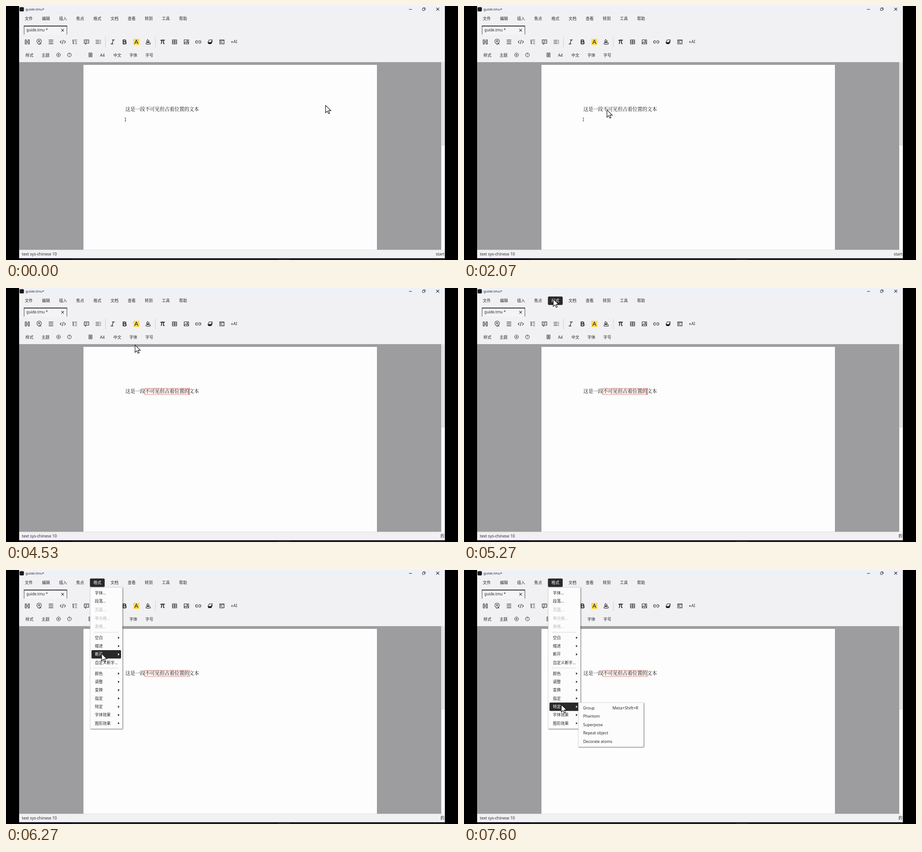
An HTML page for the animation above (8000 ms loop, 998 by 561 pixels).

```html
<!DOCTYPE html>
<html lang="zh-CN">
<head>
<meta charset="utf-8">
<style>
html, body { margin: 0; width: 100%; height: 100%; overflow: hidden; background: #000; }
svg { display: block; width: 998px; height: 561px; }
text { font: 8.7px "Noto Sans", "Noto Sans CJK SC", "Noto Sans CJK", sans-serif; fill: #29282a; white-space: pre; }
.doc { font: 10.83px "Noto Serif CJK SC", "Noto Sans CJK SC", "Noto Sans CJK", serif; fill: #111; }
.ico { fill: none; stroke: #1c1b1d; stroke-width: 1.05; stroke-linejoin: round; }
.ico .f { fill: #1c1b1d; stroke: none; }
.ico text { fill: #1c1b1d; stroke: none; text-anchor: middle; }
.hit .bg { fill: none; }
.hit.on .bg { fill: #2a282b; }
.hit.on text, .hit.on .arr { fill: #fff; }
.off text { fill: #b9b7ba; }
.arr { fill: #1c1b1d; }
.panel { fill: #fdfcfd; stroke: #cfcdd0; stroke-width: .6; filter: drop-shadow(1px 1px .8px #0008); }
</style>
</head>
<body>
<script>
const LOOP = 8000, STEP = 200 / 3;

const rect = (x, y, w, h, fill, more = '') =>
  `<rect x="${x}" y="${y}" width="${w}" height="${h}" fill="${fill}" ${more}/>`;
const path = (d, more = '') => `<path d="${d}" ${more}/>`;
const group = (inner, more = '') => `<g ${more}>${inner}</g>`;
// y is the vertical middle of the line
const label = (x, y, s, size = 8.7, more = '') =>
  `<text x="${x}" y="${y + size * .36}" style="font-size:${size}px" ${more}>${s}</text>`;
const icon = (x, y, inner) => group(inner, `class="ico" transform="translate(${x} ${y})"`);

// ---- window frame ----
function frame() {
  return rect(29, 0, 940, 557, '#f1f0f2') + rect(29, 0, 940, 14, '#eff1f8') +
    rect(29, 557, 940, 4, '#1d1c21') + rect(29, 557, 115, 4, '#15112b') + rect(601, 559, 26, 1, '#3a393d') +
    rect(30, 2.5, 9.5, 9.5, '#1a1a1c', 'rx="2"') +
    label(43, 7.5, 'guide.tmu*', 7.7) +
    icon(893, 7, path('M-3.2 .5H3.2')) +
    icon(922.5, 7, path('M-3-1.4q0-.6.6-.6h3.4q.6 0 .6.6v3.8q0 .6-.6.6h-3.4q-.6 0-.6-.6zM-1.4-3.2h3.4q1.2 0 1.2 1.2V1.6', 'stroke-width=".9"')) +
    icon(953.3, 7, path('M-3.2-3.2L3.2 3.2M3.2-3.2L-3.2 3.2'));
}

function tab() {
  return rect(40, 44, 95, 19, '#f4f3f5') +
    path('M40 63V44M134.5 44V63', 'stroke="#4a474c" fill="none"') +
    rect(39.5, 43.4, 95.5, 1.8, '#2a2030') +
    label(45, 53, 'guide.tmu *', 8.35) +
    icon(125, 53.7, path('M-2.8-2.8L2.8 2.8M2.8-2.8L-2.8 2.8'));
}

// ---- toolbar ----
function tools() {
  const lines = 'M-5-4H5M-5 0H5M-5 4H5';
  const set = [
    path('M-4.6-4.6h2.8v9.2h-2.8zM1.8-4.6h2.8v9.2H1.8zM-1.8 0h3.6'),
    path('M0 5.6L-3.7 2a5 5 0 1 1 7.4 0z') + '<circle cy="-1.6" r="1.7"/>' + path('M1 3l3.6 2'),
    path(lines, 'stroke-width="1.2"'),
    path('M-3-3L-6 0l3 3M3-3L6 0l-3 3M1-4.5l-2 9'),
    path('M-5-4h3M-1-4H5M-3.5-4V4H-1M-3.5 0H-1M1 0H5M1 4H5'),
    path('M-5-4.6H5V3H0l-2.5 2.4V3H-5zM-2.6-2H2.6M-2.6.6H1'),
    path('M-6-3.5H2.5M-6 0H2.5M-6 3.5H2.5') + path('M4-4.1h1.6v1.2H4zM4-.6h1.6v1.2H4zM4 2.9h1.6v1.2H4z', 'class="f"')
  ];
  const at = set.map((s, i) => icon(47 + i * 26.15, 79.3, s)).join('');
  const font = [
    path('M-1.5-4.5H4.5M-4.5 4.5H1.5M1.6-4.5l-3.2 9', 'stroke-width="1.2"'),
    path('M-3-4.2H.8a2 2 0 0 1 0 4.1H-3zM-3-.1H1.3a2.2 2.2 0 0 1 0 4.4H-3z', 'stroke-width="1.8"'),
    rect(-6.7, -6.7, 13.4, 13.4, '#fbdc4e', 'stroke="none"') + path('M-3.8 4.5L0-4.5 3.8 4.5M-2.5 1.5H2.5', 'stroke-width="1.1"'),
    path('M-1.4-5.2l4 3.6-3.2 3-3-2.6zM-2.6-.6H2') + '<rect x="-5" y="1.8" width="10" height="3.4" rx="1.7"/>'
  ].map((s, i) => icon(235.5 + i * 26.15, 79.3, s)).join('');
  const insert = [
    path('M-4.6-2.6q.4-1.3 1.8-1.3H4.7M-1.8-3.8q0 5-1.7 8.2M1.7-3.8v6.3q0 1.8 2.3 1.3', 'stroke-width="1.7"'),
    path('M-4.7-4.5H4.7V4.5H-4.7zM-4.7-1.5H4.7M-4.7 1.5H4.7M0-4.5V4.5'),
    path('M-5-4.5H5V4.5H-5zM-5 3l3-3 2.4 2.4L2.4.4 5 3') + '<circle cx="1.8" cy="-1.8" r=".9"/>',
    path('M-1-2.6h-2.4a2.6 2.6 0 0 0 0 5.2H-1M1-2.6h2.4a2.6 2.6 0 0 1 0 5.2H1M-2.8 0H2.8'),
    path('M-1.8-4.5H5L2.2 1H-4.8z') + path('M-5.4 1H2.4L5-3.6V.5L2.6 4.8H-3.6z', 'class="f"'),
    path('M-4.8-4.5H4.8V4.5H-4.8zM-4.8-2.5H4.8M-2.8-.8l1.6 1.5-1.6 1.5M0 2.4h2.6')
  ].map((s, i) => icon(346 + i * 26.15, 79.3, s)).join('');
  return at + font + insert +
    '<circle cx="499" cy="79.5" r="2" fill="#4a9c72"/>' + label(502, 79.3, 'AI', 8.7) +
    path('M219.5 68V91M330 68V91', 'stroke="#cfcdd1"') + path('M32.5 68V121', 'stroke="#e6e4e8"');
}

function styleBar() {
  const words = [[43, '样式'], [78.5, '主题'], [207.5, 'A4'], [237, '中文'], [272.5, '字体'], [307.7, '字号']];
  return words.map(([x, s]) => label(x, 109, s, 8.8)).join('') +
    icon(116, 108, '<circle r="4.2" stroke-width=".9"/>' + path('M-2 0H2M0-2V2', 'stroke-width=".9"')) +
    icon(140, 108, '<circle r="4.2" stroke-width=".9"/>' + label(0, 0, '?', 6.5)) +
    icon(186.5, 108, path('M-3.5-4.3H3.5V4.3H-3.5zM-2-2.2H2M-2-.7H2M-2 .8H2M-2 2.3H2', 'stroke-width=".9"'));
}

function desk() {
  return rect(29, 124, 932, 414.5, '#9d9c9e') + rect(171, 130, 648, 408.5, '#fefdfe') +
    rect(961, 124, 8, 414.5, '#fbfafb') + rect(961.5, 124, 7, 184.5, '#e1e0e2') +
    label(35, 547.8, 'text sys-chinese 10', 8.75);
}

// ---- menus ----
const names = ['文件', '编辑', '插入', '焦点', '格式', '文档', '查看', '转到', '工具', '帮助'];
const tabX = i => 50.3 + i * 37.85;
const menuBar = names.map((s, i) => group(
  rect(tabX(i) - 16.4, 18.8, 32.6, 18.8, '', 'class="bg" rx="2.5"').replace('fill=""', '') +
  label(tabX(i), 28.2, s, 8.75, 'text-anchor="middle"'), `class="hit" id="m${i}"`)).join('');

// [label, middle, kind]: a has a submenu, d is disabled
const rows = [
  ['字体...', 50.5], ['段落...', 69], ['页面...', 87.7, 'd'], ['单元格...', 106.5, 'd'], ['表格...', 125.3, 'd'],
  ['空白', 149.7, 'a'], ['缩进', 168, 'a'], ['断开', 186.3, 'a'], ['自定义断字...', 204.7],
  ['颜色', 228.7, 'a'], ['调整', 247, 'a'], ['变换', 265.3, 'a'], ['指定', 283.6, 'a'],
  ['特定', 302, 'a'], ['字体效果', 320.2, 'a'], ['图形效果', 338.5, 'a']
];
const menu = rect(186, 38.5, 71, 312, '', 'class="panel"').replace('fill=""', '') +
  path('M194 137.5H248M194 216.5H248', 'stroke="#d8d6d9"') +
  rows.map(([s, y, kind], i) => group(
    `<rect class="bg" x="188.7" y="${y - 9.2}" width="65.3" height="18.4" rx="2"/>` +
    label(196.3, y, s, 8.7) +
    (kind == 'a' ? path(`M247.3 ${y - 2.6}l3.4 2.6-3.4 2.6z`, 'class="arr"') : ''),
    `class="hit ${kind == 'd' ? 'off' : ''}" id="r${i}"`)).join('');

const submenu = (id, top, w, items, keys = '') => group(
  `<rect class="panel" x="252.7" y="${top}" width="${w}" height="${items.length * 18.35 + 5.8}"/>` +
  items.map((s, i) => label(263, top + 12 + i * 18.35, s, 8.65)).join('') +
  (keys && label(385, top + 12, keys, 9.1, 'text-anchor="end"')), `id="${id}"`);

const cursor = path('M.6.6V16.6L4.4 13.1 7 18.8 9.6 17.6 7.1 12.1H12.4z',
  'id="cursor" fill="#fff" stroke="#111" stroke-width="1.15"');

document.body.innerHTML = `<svg viewBox="0 0 998 561">` +
  frame() + menuBar + tab() + tools() + styleBar() + desk() +
  label(968, 547.8, 'start', 8.75, 'id="status" text-anchor="end"') +
  rect(306.5, 221.5, 0, 14, '#faf1ef', 'id="sel" stroke="#d98b85" stroke-width=".9"') +
  '<text class="doc" x="263.6" y="232">这是一段不可见但占着位置的文本</text>' +
  path('', 'id="caret" fill="none"') +
  group(menu, 'id="menu"') +
  submenu('specific', 274.5, 67, ['TeXmacs', 'LaTeX', 'HTML', '屏幕', '打印机', '图像', '偶数页', '奇数页']) +
  submenu('special', 293, 143.7, ['Group', 'Phantom', 'Superpose', 'Repeat object', 'Decorate atoms'], 'Meta+Shift+R') +
  cursor + '</svg>';

// ---- motion ----
const keys = [ // time, x, y of the pointer tip
  [0, 705, 219], [500, 202, 91], [867, 330, 231], [1000, 334, 239], [1230, 282, 74], [1467, 315, 229],
  [2067, 315, 229], [2270, 309, 229], [2867, 390, 228], [3333, 398, 228], [3533, 402, 228], [4133, 402, 228],
  [4933, 168, 24], [5000, 168, 24], [5267, 196.5, 24], [5867, 196.5, 24], [6267, 210.5, 184], [6733, 212, 278],
  [6933, 212, 289], [7000, 212, 289], [7267, 214.3, 297], [LOOP, 214.3, 297]
];
const slope = (i, k) => keys[i] && keys[i + 1]
  ? (keys[i + 1][k] - keys[i][k]) / (keys[i + 1][0] - keys[i][0]) : 0;
const tangent = (i, k) => {
  const a = slope(i - 1, k), b = slope(i, k);
  return a * b > 0 ? 2 * a * b / (a + b) : 0;
};
// Monotone cubic through the keys: smooth without overshoot
function at(t, k) {
  let i = 0;
  while (i < keys.length - 2 && t >= keys[i + 1][0]) i++;
  const h = keys[i + 1][0] - keys[i][0], u = (t - keys[i][0]) / h, v = 1 - u;
  return keys[i][k] * (1 + 2 * u) * v * v + keys[i + 1][k] * (3 - 2 * u) * u * u +
    h * u * v * (tangent(i, k) * v - tangent(i + 1, k) * u);
}

const $ = id => document.getElementById(id);
const show = (id, on) => $(id).style.display = on ? '' : 'none';
const CHAR = 10.83, SEL = 306.5;

function draw(time) {
  const t = Math.floor((time + 4) / STEP) * STEP + 1;
  const x = at(t, 1), y = at(t, 2), open = t >= 5460;
  $('cursor').setAttribute('transform', `translate(${x} ${y})`);

  const drag = t > 2260;
  const count = drag ? Math.max(0, Math.min(9, Math.round((at(Math.min(t, 3540), 1) - SEL) / CHAR))) : 0;
  const end = SEL + count * CHAR;
  show('sel', count);
  $('sel').setAttribute('width', end - SEL + (open ? 1.3 : .6));
  show('caret', !open);
  $('caret').setAttribute('d', drag
    ? `M${end - 1.2} 222h3M${end + .3} 222V235M${end - 1.2} 235h3`
    : 'M262 247.3h3.2M263.6 247.3V254M262 254h3.2');
  $('caret').setAttribute('stroke', drag ? '#d8322c' : t > 2060 ? '#a8423f' : '#4b484c');
  $('status').textContent = t >= 3660 ? '的' : 'start';

  names.forEach((_, i) => $('m' + i).classList.toggle('on',
    open ? i == 4 : y > 18 && y < 38 && Math.abs(x - tabX(i)) < 18.9));
  show('menu', open);
  rows.forEach(([, mid, kind], i) => $('r' + i).classList.toggle('on', kind != 'd' && Math.abs(y - mid) < 9.17));
  show('specific', t >= 7060 && t < 7595);
  show('special', t >= 7595);
}

const start = performance.now();
function tick() {
  draw((performance.now() - start) % LOOP);
  requestAnimationFrame(tick);
}
tick();
</script>
</body>
</html>
```
